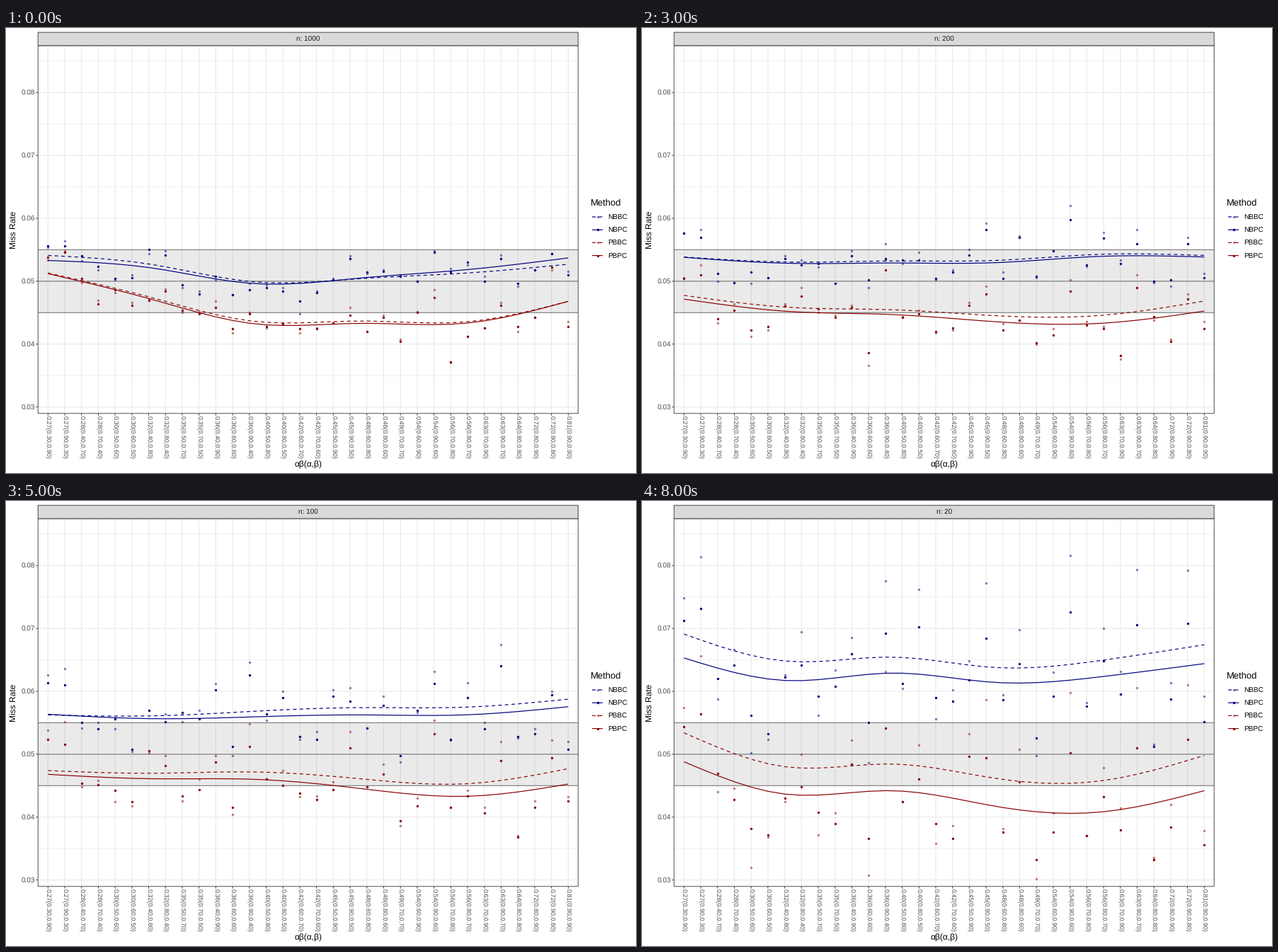
These frames come from a looping animation (890x629 px, 9000 ms). A matplotlib script:

```python
from itertools import product

import numpy as np
import matplotlib.pyplot as plt
from matplotlib.animation import FuncAnimation
from matplotlib.patches import Rectangle

W, H, DPI = 890, 629, 100
PX = 72 / DPI
plt.rcParams["font.family"] = "Liberation Sans"
plt.rcParams["text.hinting"] = "none"
plt.rcParams["text.hinting_factor"] = 1

LEFT, RIGHT, TOP, BOTTOM, STRIP = 45.2, 808.2, 24.9, 544.8, 6.1
INK, GRID = "#333333", "#ebebeb"
COLORS = {"NB": "#000080", "PB": "#8b0000"}
SIZES = [1000, 500, 250, 200, 150, 100, 75, 50, 20]

levels = np.arange(3, 10)
pairs = sorted((p for p in product(levels, levels) if p[0] * p[1] >= 27),
               key=lambda p: (p[0] * p[1], p[0]))
labels = [f"{a * b / 100:.2f}({a / 10:.2f},{b / 10:.2f})" for a, b in pairs]
a, b = np.transpose(pairs)
N = len(pairs)
xs = np.linspace(59.3, 794.3, N)

# Evenly spaced knots of the solid trend and of the dashed trend's lead over
# it, in units of 0.0001; sizes left out lie between their neighbours.
TRENDS = {
    "NB": {1000: ([533, 521, 496, 505, 518, 537], [8, 1, -10]),
           250: ([531, 507, 506, 509, 527, 550], [-5, 1, 0]),
           150: ([545, 550, 552, 550, 552, 527], [6, 6, 5]),
           75: ([582, 563, 567, 575, 573, 624], [-8, 15, 19]),
           50: ([606, 598, 595, 609, 584, 575], [1, 14, 0]),
           20: ([653, 617, 629, 614, 623, 644], [38, 24, 30])},
    "PB": {1000: ([512, 471, 432, 433, 433, 468], [1, 4, 0]),
           250: ([470, 443, 437, 422, 424, 473], [12, 6, 10]),
           150: ([473, 461, 457, 449, 442, 432], [0, 11, 22]),
           75: ([463, 461, 463, 442, 424, 473], [12, 16, 27]),
           50: ([482, 458, 458, 454, 414, 421], [18, 14, 31]),
           20: ([488, 436, 442, 417, 408, 442], [46, 43, 56])},
}


def spline(knots):
    """Natural cubic spline through evenly spaced knots, at every pair."""
    k = np.asarray(knots, float)
    m = len(k)
    A = np.eye(m)
    rhs = np.zeros(m)
    for i in range(1, m - 1):
        A[i, i - 1:i + 2] = 1, 4, 1
        rhs[i] = 6 * (k[i - 1] - 2 * k[i] + k[i + 1])
    c = np.linalg.solve(A, rhs)
    t = np.linspace(0, m - 1, N)
    i = np.minimum(t.astype(int), m - 2)
    u = t - i
    v = 1 - u
    return (v * k[i] + u * k[i + 1]
            + ((v**3 - v) * c[i] + (u**3 - u) * c[i + 1]) / 6)


def trend(family, part):
    """Trend (part 0) or lead (part 1) for each sample size."""
    keys = [SIZES.index(n) for n in TRENDS[family]]
    rows = np.array([spline(v[part]) for v in TRENDS[family].values()])
    return np.transpose([np.interp(range(len(SIZES)), keys, col)
                         for col in rows.T])


def scatter(solid, seed):
    """Rates of the PC and BC methods around the solid trend.

    Unequal pairs miss more often, most of all when alpha is the larger;
    the effect fades as samples grow.
    """
    rng = np.random.default_rng(seed)
    small = 20 / np.array(SIZES)[:, None]
    lean = np.where(a > b, 55 * (a - 7.45), 24 * (b - a) - 75)
    shift = 32 * (np.maximum(a, b) - 8) + 55 * (a > b)
    pc = solid + small**0.3 * lean + rng.normal(0, 16, solid.shape)
    bc = pc + small**0.75 * shift + rng.normal(0, 5, solid.shape)
    return 2 * np.round(pc / 2), 2 * np.round(bc / 2)


def ypx(rate):
    return 357.9 - (np.asarray(rate) - 500) * 0.889


curves, dots = {}, {}
for seed, fam in enumerate(TRENDS):
    solid = trend(fam, 0)
    curves[fam + "BC"], curves[fam + "PC"] = solid + trend(fam, 1), solid
    dots[fam + "PC"], dots[fam + "BC"] = scatter(solid, seed)

fig = plt.figure(figsize=(W / DPI, H / DPI), dpi=DPI, facecolor="white")
ax = fig.add_axes([0, 0, 1, 1])
ax.set(xlim=(0, W), ylim=(H, 0))
ax.axis("off")


def line(x, y, color, width, z, **kw):
    return ax.plot(x, y, color=color, lw=width * PX, zorder=z, snap=False,
                   solid_capstyle="butt", dash_capstyle="butt", **kw)[0]


def box(x0, y0, x1, y1, z, **kw):
    ax.add_patch(Rectangle((x0, y0), x1 - x0, y1 - y0, zorder=z,
                           snap=False, **kw))


def text(x, y, s, size, color="black", **kw):
    kw = {"ha": "center", "va": "center_baseline", **kw}
    return ax.text(x, y, s, fontsize=size * PX, color=color, **kw)


def trend_line(name, x, y):
    dash = (0, (4.2, 3.6)) if name.endswith("BC") else "-"
    return line(x, y, COLORS[name[:2]], 1.2, 5, ls=dash)


def points(name, x, y):
    light = name.endswith("BC")
    return ax.plot(x, y, "o", ms=3.4 * PX, mew=0, color=COLORS[name[:2]],
                   alpha=0.5 if light else 1, zorder=3 if light else 4,
                   snap=False)[0]


# Panel
for rate in range(350, 851, 100):
    line([LEFT, RIGHT], [ypx(rate)] * 2, GRID, 0.6, 1)
for rate in range(300, 801, 100):
    y = ypx(rate)
    line([LEFT, RIGHT], [y, y], GRID, 1.2, 1)
    line([LEFT - 3, LEFT], [y, y], INK, 0.9, 6)
    text(41, y + 0.5, f"{rate / 1e4:.2f}", 9.9, "#4d4d4d", ha="right")
for x, label in zip(xs, labels):
    line([x, x], [TOP, BOTTOM], GRID, 1.2, 1)
    line([x, x], [BOTTOM, BOTTOM + 3], INK, 0.9, 6)
    text(x, 548.5, label, 8.7, "#4d4d4d", rotation=-90, va="top")
box(LEFT, ypx(550), RIGHT, ypx(450), 2, fc=INK, alpha=0.1, lw=0)
for rate in (450, 500, 550):
    line([LEFT, RIGHT], [ypx(rate)] * 2, "#7f7f7f", 1.15, 2)
box(LEFT, TOP, RIGHT, BOTTOM, 6, fill=False, ec=INK, lw=0.85 * PX)
box(LEFT, STRIP, RIGHT, TOP, 7, fc="#d9d9d9", ec=INK, lw=0.9 * PX)
title = text((LEFT + RIGHT) / 2, 15.6, "", 9.8, "#1a1a1a", zorder=8)

text(11, 285, "Miss Rate", 12.4, rotation=90, va="center")
text(427, 616, "αβ(α,β)", 12.4)

# Legend
text(826, 246, "Method", 12.5, ha="left")
for i, name in enumerate(curves):
    y = 267 + 18.2 * i
    trend_line(name, [828, 843], [y, y])
    points(name, [835.5], [y])
    text(850.5, y + 0.3, name, 10, ha="left")

lines = {name: trend_line(name, xs, xs) for name in curves}
marks = {name: points(name, xs, xs) for name in curves}


def update(step):
    title.set_text(f"n: {SIZES[step]}")
    for name in curves:
        lines[name].set_ydata(ypx(curves[name][step]))
        marks[name].set_ydata(ypx(dots[name][step]))
    return [title, *lines.values(), *marks.values()]


anim = FuncAnimation(fig, update, frames=len(SIZES), interval=1000,
                     repeat=True, repeat_delay=0, blit=False)
plt.show()
```
